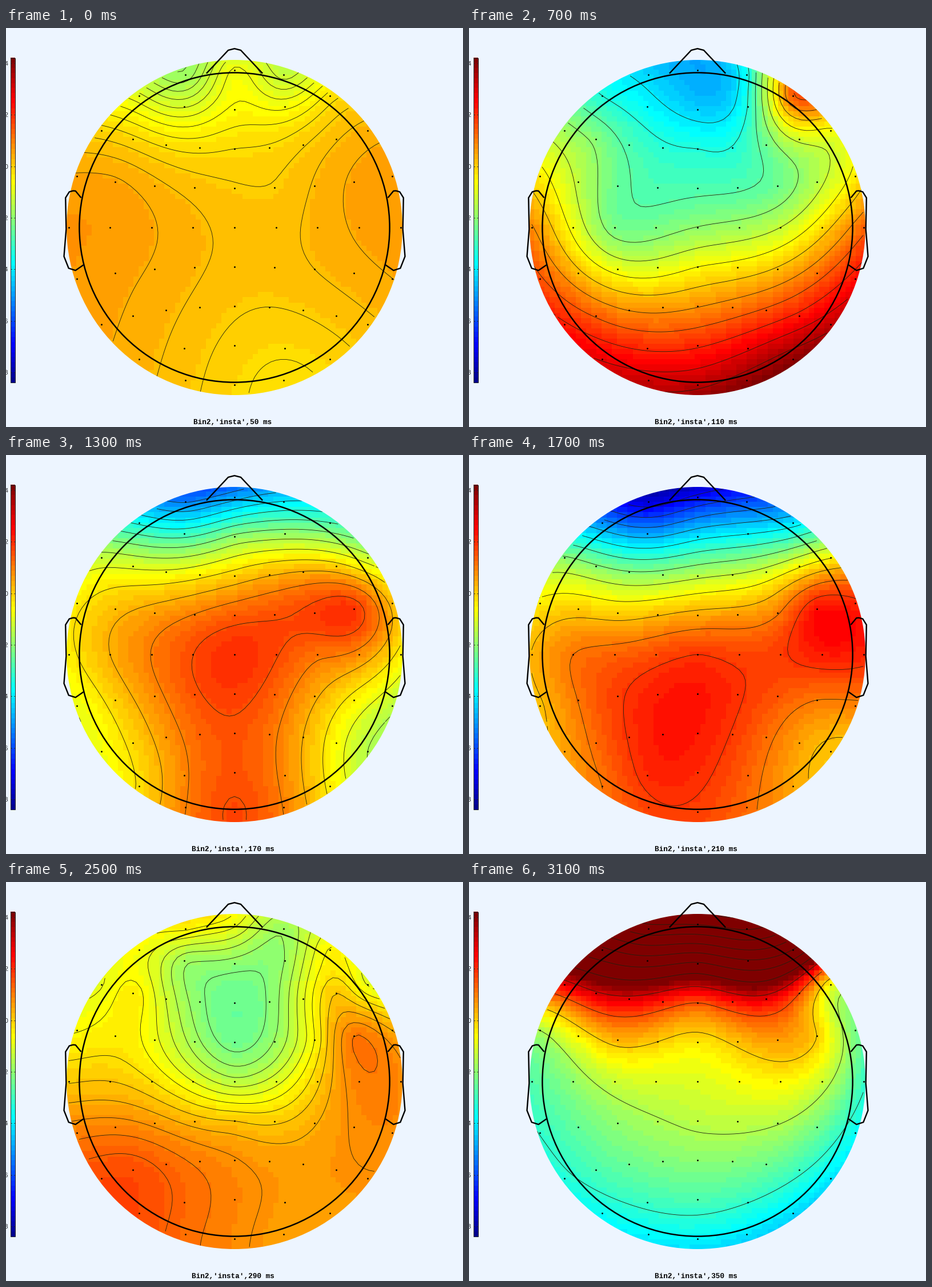
Write a matplotlib script that moves like this. It is 800 by 700 pixels and loops after 3.2 s.

```python
import numpy as np
import matplotlib.pyplot as plt
from matplotlib.animation import FuncAnimation
from matplotlib.colors import ListedColormap
from matplotlib.patches import Circle, Rectangle

PX = 0.72                       # points per pixel at 100 dpi
CX, CY = 400, 350
UNIT, RIM, HEAD = 598.5, 294, 271.6
VMIN, VMAX = -8.4, 4.2
BACK = (0.93, 0.96, 1.0)
N = 67


def electrodes():
    """Sites on nine bowed rows; odd columns on the left, even on the right, z between."""
    places = {}
    for row, name in enumerate(["Fp", "AF", "F", "FC", "C", "CP", "P", "PO", "O"]):
        n = abs(row - 4)
        side = 1 if row > 4 else -1
        turn, radius = np.radians(18.05 * n), 290.5 - 0.56 * n * n
        end_x, end_y, mid_y = radius * np.cos(turn), radius * np.sin(turn), 69.1 * n
        stride = {4: 4, 3: 2}.get(n, 1)
        for k in range(-4, 5, stride):
            t = abs(k) / 4
            x = end_x * t * (1 + 0.022 * n * (1 - t * t))
            y = mid_y + (end_y - mid_y) * t ** 2.3
            column = str(2 * abs(k) - (k < 0)) if k else "z"
            places[name + column] = np.array([np.sign(k) * x, side * y])
    return places


SITES = electrodes()
axis = np.linspace(-0.5, 0.5, N)
gx, gy = np.meshgrid(axis, axis)
GRID = np.column_stack([gx.ravel(), gy.ravel()])
outside = np.hypot(gx, gy) > 0.5


def kernel(a, b):
    r2 = ((a[:, None] - b[None]) ** 2).sum(axis=2) + 1e-15
    return r2 * np.log(r2)


def plane(p):
    return np.column_stack([np.ones(len(p)), p])


def thin_plate(points, values):
    """Smoothest surface through a few points, evaluated on the grid."""
    n = len(points)
    system = np.zeros((n + 3, n + 3))
    system[:n, :n] = kernel(points, points)
    system[:n, n:] = plane(points)
    system[n:, :n] = plane(points).T
    w = np.linalg.solve(system, np.append(values, np.zeros(3)))
    return kernel(GRID, points) @ w[:n] + plane(GRID) @ w[n:]


times, maps = [], []


def key(ms, base, step, **peaks):
    """Scalp map at one latency from its key sites, in contour steps above base."""
    points = np.array([SITES[s] for s in peaks]) / UNIT
    steps = thin_plate(points, list(peaks.values()))
    times.append(ms)
    maps.append(np.append(base + step * steps, [base, step]))


key(50, -2.1, 0.212, Fp7=1.3, Fpz=6.2, Fp8=3.6, AF7=5.3, AF8=8.4, Fz=9, F4=9.9,
    FC5=12.2, FC2=10.1, FC6=12.2, C1=11.3, CP5=12.4, CP4=11, Pz=10.2, O7=10.4, O8=8.7)
key(110, -4.75, 0.69, Fp7=0.7, Fp8=1.7, AF7=2, AF4=2, AF8=8.9, F5=3.8, Fz=2, F8=5.8,
    FC4=3.4, C7=8.1, C3=3.6, C8=8.7, CPz=6, P5=8.9, P6=10.2, Oz=11.8, PO8=12.6)
key(170, -5.95, 0.63, Fp7=0.9, Fpz=1.6, AFz=6.2, AF8=5, F7=7.4, Fz=9.4, F8=7.4,
    FC6=12.5, C5=10, Cz=12.6, C4=11.2, C8=8.7, CP7=8.1, CP3=10.7, CP6=8.7,
    P8=7, PO7=9.1, Oz=12.1)
key(210, -7.85, 0.81, Fp7=0.5, Fpz=1.2, AFz=4.7, AF8=4.6, F7=7.1, Fz=7.8, FC3=9.6,
    FC4=10.9, FC6=12.6, C5=11, Cz=12, CP7=9.9, CP1=12.4, CP6=11, P8=9.8,
    PO7=11, PO3=12.2, O8=11.2)
key(240, -8.5, 1.0, Fp7=0.5, Fp8=0.7, AFz=3.3, AF8=3.1, F7=5.5, Fz=5.1, F6=6.6,
    FCz=6.7, FC4=8, FC6=9.8, C7=9, Cz=8.8, C8=10.4, CP5=10.3, CP6=10.4, Pz=11.5,
    P8=10.8, O7=12.7, O8=12.4)
key(290, -2.52, 0.325, Fp7=6.2, Fpz=5.3, Fp8=2.2, AF3=2.3, AF4=2, AF8=6.1, F7=4.9,
    F5=6.5, F1=1.3, F2=1.2, F6=8, F8=4.9, FC3=5.3, FCz=0.5, FC4=6, FC6=11, C7=7.9,
    Cz=3.4, C8=10.3, CPz=8, P5=12.6, Pz=10.1, O7=11.4, O8=9.5)
key(350, -4.8, 1.6, Fp7=10.6, Fp8=11.1, AF7=7.8, AFz=6.9, AF8=8, F5=4.9, Fz=4, F6=4,
    F8=2.6, FC7=2, FC3=3.2, FCz=2.8, FC6=3, C7=1.3, C8=1.1, CPz=2.1, P7=0.9, Pz=1.7,
    P8=0.5, Oz=0.6)

times = np.array(times, float)
maps = np.array(maps)
slopes = np.gradient(maps, times, axis=0)


def map_at(ms):
    """Smooth (Hermite) course of the whole map through the key latencies."""
    i = min(np.searchsorted(times, ms, side="right") - 1, len(times) - 2)
    h = times[i + 1] - times[i]
    u = (ms - times[i]) / h
    return ((1 + 2 * u) * (1 - u) ** 2 * maps[i] + u * (1 - u) ** 2 * h * slopes[i]
            + u * u * (3 - 2 * u) * maps[i + 1] - u * u * (1 - u) * h * slopes[i + 1])


def jet(n=64):
    j = np.arange(1, n + 1)
    ramp = lambda k: np.clip(np.minimum(k, 48 - k) / 16, 0, 1)
    return ListedColormap(np.column_stack([ramp(j - 24), ramp(j - 8), ramp(j + 8)]))


CMAP = jet()

fig = plt.figure(figsize=(8, 7), dpi=100, facecolor=BACK)
ax = fig.add_axes([0, 0, 1, 1])
ax.axis("off")

disc = Circle((CX, CY), RIM, transform=ax.transData)
half = UNIT / 2 * N / (N - 1)
surface = ax.imshow(np.zeros((N, N)), cmap=CMAP, vmin=VMIN, vmax=VMAX, aspect="auto",
                    interpolation="nearest", zorder=1,
                    extent=(CX - half, CX + half, CY + half, CY - half))
surface.set_clip_path(disc)


def outline(x, y):
    ax.plot(CX + np.array(x) * 545.7, CY - np.array(y) * 545.7, color="k",
            lw=2.4 * PX, zorder=4, solid_joinstyle="round", solid_capstyle="butt")


# Head, nose and ears
ax.add_patch(Circle((CX, CY), HEAD, fill=False, ec="k", lw=2.5 * PX, zorder=4))
outline([0.09, 0.02, 0, -0.02, -0.09], [0.4954, 0.57, 0.575, 0.57, 0.4954])
ear_x = np.array([0.492, 0.51, 0.518, 0.53, 0.542, 0.54, 0.547, 0.532, 0.51, 0.484])
ear_y = [0.0955, 0.1175, 0.118, 0.1146, 0.0955, -0.0055, -0.093, -0.131, -0.138, -0.12]
outline(ear_x, ear_y)
outline(-ear_x, ear_y)
dots = np.array(list(SITES.values()))
ax.plot(CX + dots[:, 0], CY + dots[:, 1], "o", color="k", ms=2.9 * PX, mew=0, zorder=5)

# Colour bar, cut off by the left edge of the stage
TOP, BOTTOM = 52.8, 622.4
ax.imshow(np.arange(64)[::-1, None], cmap=CMAP, aspect="auto", interpolation="nearest",
          extent=(8, 15.5, BOTTOM, TOP))
ax.add_patch(Rectangle((8, TOP), 7.5, BOTTOM - TOP, fill=False, ec="#262626", lw=PX, zorder=3))
for v in range(-8, 5, 2):
    y = TOP + (VMAX - v) / (VMAX - VMIN) * (BOTTOM - TOP)
    for x in (8, 14):
        ax.plot([x, x + 1.5], [y, y], color="#262626", lw=0.8 * PX, zorder=3)
    ax.text(3.5, y, str(v), ha="right", va="center_baseline", color="#262626",
            family="Liberation Sans", size=10.5 * PX)

label = ax.text(397, 695, "", ha="center", va="baseline", color="k", weight="bold",
                family="Liberation Mono", size=12.6 * PX)
ax.set_xlim(0, 800)
ax.set_ylim(700, 0)

lines = None


def draw(frame):
    global lines
    ms = 50 + 10 * max(0, frame - 1)        # the first latency is held for two frames
    state = map_at(ms)
    field = state[:-2].reshape(N, N)
    base, step = state[-2:]
    surface.set_data(field)
    if lines is not None:
        lines.remove()
    lines = ax.contour(CX + axis * UNIT, CY + axis * UNIT,
                       np.ma.masked_array(field, outside), base + step * np.arange(1, 13),
                       colors=["#20200f"], linestyles="solid", linewidths=0.85 * PX,
                       corner_mask=False, zorder=2)
    lines.set_clip_path(disc)
    label.set_text(f"Bin2,'insta',{ms} ms")
    return surface, label


anim = FuncAnimation(fig, draw, frames=32, interval=100, repeat=True, repeat_delay=0,
                     init_func=lambda: draw(0), blit=False)
plt.show()
```
